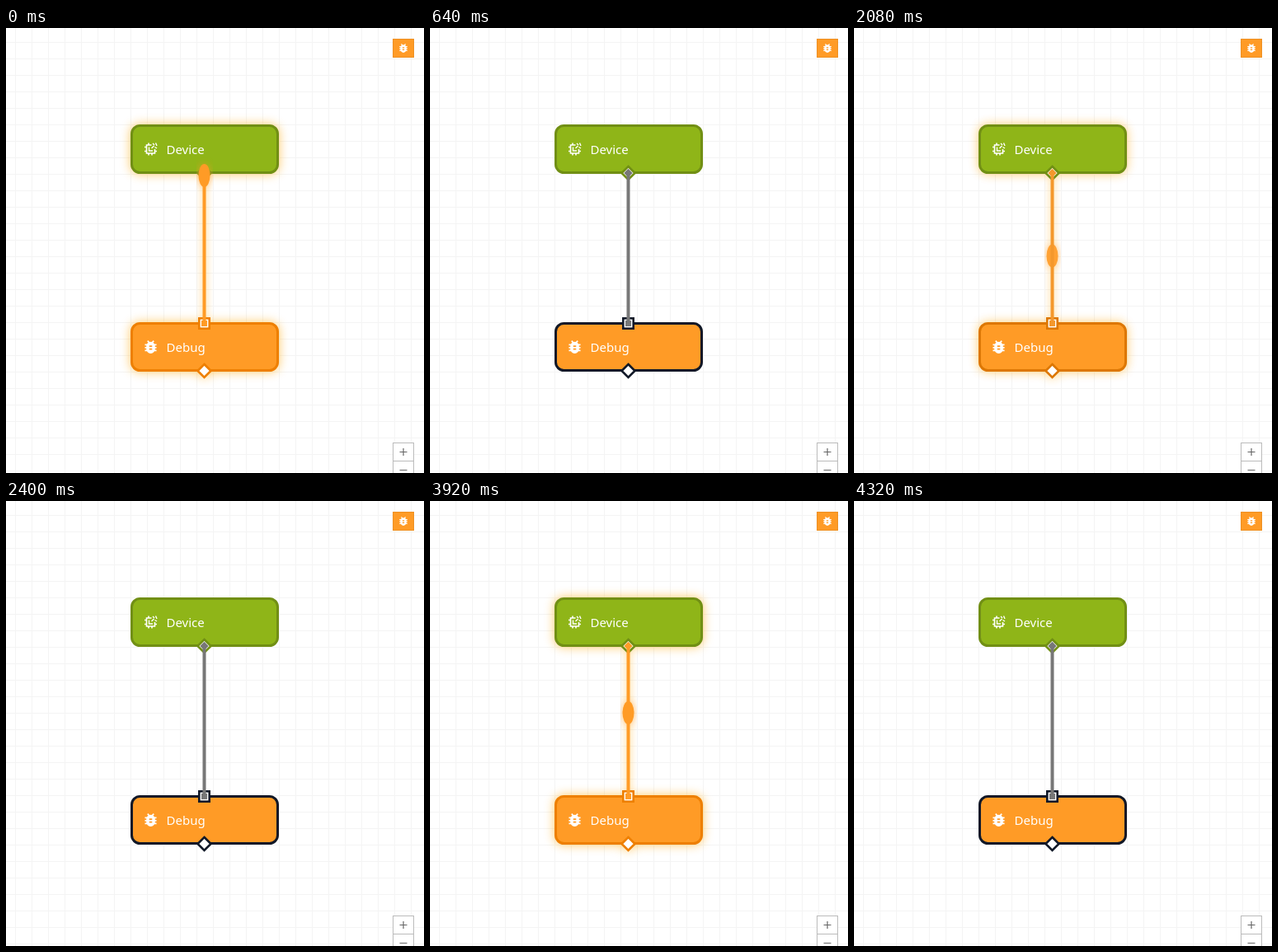
These frames come from a looping animation (507x540 px, 4640 ms). An HTML page:

```html
<!DOCTYPE html>
<html lang="en">
<head>
<meta charset="utf-8">
<title>Device to Debug flow</title>
<style>
html, body { margin: 0; width: 100%; height: 100%; overflow: hidden; background: #fff; }
svg { display: block; width: 507px; height: 540px; }
text { font: 500 15px "Noto Sans", "Open Sans", sans-serif; fill: #fff; }
.box { stroke-width: 3; }
.port { fill: #fff; stroke-width: 2.6; }
.zoom { fill: #fff; stroke: #bbb; }
</style>
</head>
<body>
<svg viewBox="0 0 507 540">
  <defs>
    <pattern id="grid" x="11" y="17" width="20" height="20" patternUnits="userSpaceOnUse">
      <path d="M.5 0V20M0 .5H20" stroke="#f4f4f4"/>
    </pattern>
    <filter id="blur" filterUnits="userSpaceOnUse" x="120" y="80" width="240" height="380">
      <feGaussianBlur stdDeviation="6.3"/>
    </filter>
    <filter id="soft" filterUnits="userSpaceOnUse" x="231" y="100" width="20" height="340">
      <feGaussianBlur stdDeviation="5"/>
    </filter>
    <path id="bug" d="M20 8h-2.81a6 6 0 0 0-1.82-1.96L17 4.41 15.59 3l-2.17 2.17a6 6 0 0 0-2.83 0L8.41 3 7 4.41l1.62 1.63A6 6 0 0 0 6.81 8H4v2h2.09c-.05.33-.09.66-.09 1v1H4v2h2v1c0 .34.04.67.09 1H4v2h2.81a6 6 0 0 0 10.38 0H20v-2h-2.09c.05-.33.09-.66.09-1v-1h2v-2h-2v-1c0-.34-.04-.67-.09-1H20zm-6 8h-4v-2h4zm0-4h-4v-2h4z"/>
  </defs>
  <rect width="507" height="540" fill="url(#grid)"/>

  <g id="glow">
    <g filter="url(#blur)" fill="#ffa500" opacity=".6">
      <rect x="151" y="117" width="180" height="60" rx="11"/>
      <rect x="151" y="357" width="180" height="60" rx="11"/>
      <path d="M231 416l9.5 9.5 9.5-9.5z"/>
    </g>
    <path d="M240.5 176V358" stroke="#ffa500" stroke-width="4" opacity=".6" filter="url(#soft)"/>
  </g>

  <rect class="box" x="152.5" y="118.5" width="177" height="57" rx="10" fill="#8fb518" stroke="#718f14"/>
  <text x="194.5" y="152.5">Device</text>
  <g transform="translate(175.5 147)" fill="none" stroke="#fff" stroke-width="1.6">
    <path d="M1-5H-5V5H5V0M-2.5-5v-2.5M1.5 5v2.5M-2.5 5v2.5M-5-2.5h-2.5M-5 2.5h-2.5M5 2.5h2.5"/>
    <path d="M-2-2.5V2H2.5M1-1L4-4M2.5-7L4.5-5M5-2.5L7.5-1M6-7.5L7.5-4" stroke-width="1.4"/>
  </g>

  <rect class="box live" x="152.5" y="358.5" width="177" height="57" rx="10" fill="#ff9b26"/>
  <text x="194.5" y="392.5">Debug</text>
  <use href="#bug" fill="#fff" transform="translate(175.5 387) scale(.88) translate(-12 -12)"/>

  <path class="port" d="M240.5 168l8 8-8 8-8-8z" stroke="#718f14"/>
  <path class="wire" d="M240.5 170.8l5.2 5.2-5.2 5.2-5.2-5.2z"/>
  <rect class="port live" x="234.3" y="352.3" width="12.4" height="12.4"/>
  <rect class="wire" x="237" y="355" width="7" height="7"/>
  <path class="port live" d="M240.5 408l8 8-8 8-8-8z"/>

  <g id="blob" fill="#ff9b26">
    <ellipse cx="240.5" rx="7" ry="14" opacity=".6" filter="url(#soft)"/>
    <ellipse cx="240.5" rx="7" ry="14"/>
  </g>
  <rect class="wire" x="238.5" y="176" width="4" height="182"/>

  <rect x="469.5" y="13.5" width="25" height="22" fill="#ff9b26" stroke="#ee9023"/>
  <use href="#bug" fill="#fff" transform="translate(482 24.5) scale(.6) translate(-12 -12)"/>
  <rect class="zoom" x="469.5" y="503.5" width="25" height="22"/>
  <rect class="zoom" x="469.5" y="525.5" width="25" height="22"/>
  <path d="M477.5 514.5h9M482 510v9M477.5 536.5h9" stroke="#666" stroke-width="1.2"/>
</svg>
<script>
const LOOP = 4640, STEP = 80, IDLE = 720;
const $ = id => document.getElementById(id);
const fill = (name, prop, color) =>
  document.querySelectorAll(name).forEach(el => el.style[prop] = color);
const mix = (a, b, k) => `rgb(${a.map((v, i) => Math.round(v + (b[i] - v) * k))})`;
const ellipses = $('blob').querySelectorAll('ellipse');

// Time since the current message left the device
function phase(t) {
  if (t >= 3600) return t - 3600;
  if (t >= 1760) return t - 1680;
  return t && t + 80;
}

function draw(now) {
  const t = Math.floor(now % LOOP / STEP) * STEP;
  const p = phase(t);
  const fade = Math.min(1, Math.max(0, 1 - (p - 390) / 300));
  const k = p >= IDLE ? 0 : fade ** 2.4;
  $('glow').style.opacity = $('blob').style.opacity = k;
  ellipses.forEach(e => e.setAttribute('cy', 179 + Math.min(p, IDLE) * .244));
  fill('.live', 'stroke', mix([17, 24, 39], [238, 127, 0], k));
  fill('.wire', 'fill', mix([119, 119, 119], [255, 155, 38], k));
}

const start = performance.now();
function tick() {
  draw(performance.now() - start);
  requestAnimationFrame(tick);
}
tick();
</script>
</body>
</html>
```
